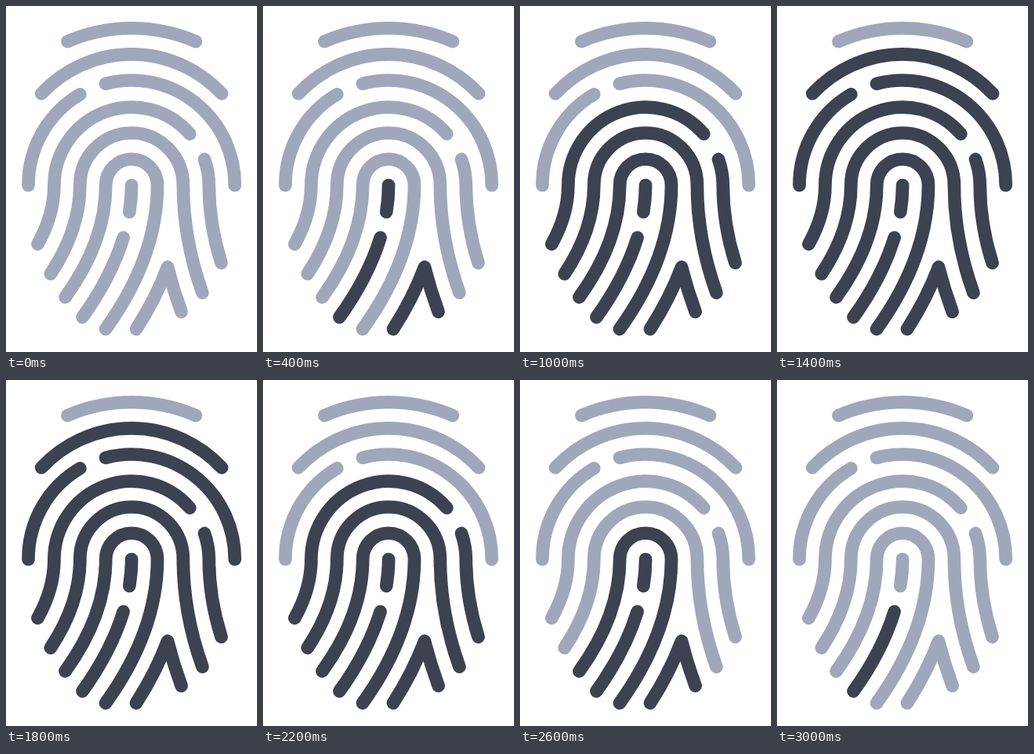
Recreate the animation shown at these times as an HTML page. Size 320 by 440 pixels, loop 3200 ms.

```html
<!DOCTYPE html>
<html lang="en">
<head>
<meta charset="utf-8">
<title>Fingerprint scan</title>
<style>
  html, body { margin: 0; width: 100%; height: 100%; overflow: hidden; background: #fff; }
  svg { display: block; width: 320px; height: 440px; }
  path { fill: none; stroke-width: 16.7; stroke-linecap: round; stroke-linejoin: round; }
</style>
</head>
<body>
<svg id="print" viewBox="0 0 320 440"></svg>
<script>
const STEP = 200;
const LIGHT = '#a0a7ba';
const DARK = '#3d4251';
const CX = 160.1, CY = 228, RX = 32.9, RY = 33.25;

const edge = n => CX + n * RX;
const arc = (n, x, y) => `A${Math.abs(n) * RX} ${Math.abs(n) * RY} 0 0 1 ${x} ${y}`;

// A ridge tail leaves the arch vertically and bends outwards.
const tailIn = (x, y, n) => `M${x} ${y}Q${edge(n)} ${(y + CY) / 2} ${edge(n)} ${CY}`;
const tailOut = (n, x, y) => `Q${edge(n)} ${(y + CY) / 2} ${x} ${y}`;
const arch = n => arc(n, edge(n), CY);

// Ridges in the order in which they light up, from the core to the tip.
const ridges = [
  'M149.6 294.6Q134 345 97.5 395.7',
  `M${CX} ${CY}Q${CX} 245 157.3 262M166 410.8Q191.3 371.5 206 332Q213.2 360.5 223.6 388.8`,
  tailIn(75.5, 370.3, -1) + arch(1) + tailOut(1, 127, 410.8),
  tailIn(56.8, 340.6, -2) + arch(2) + tailOut(2, 250.4, 364.7),
  tailIn(40.4, 302.8, -3) + arc(3, 234.3, 162.6)
    + `M253 195${arc(3, edge(3), CY)}` + tailOut(3, 274.5, 326.7),
  `M${edge(-4)} ${CY}${arc(4, 94.4, 112.4)}M127 98.8${arc(4, edge(4), CY)}`,
  'M45.2 111.4A157 157 0 0 1 275 111.4',
  'M78.4 45.1A207 207 0 0 1 241.9 45.1'
];

const svg = document.getElementById('print');
const paths = ridges.map(d => {
  const path = document.createElementNS('http://www.w3.org/2000/svg', 'path');
  path.setAttribute('d', d);
  return svg.appendChild(path);
});

function draw(time) {
  const count = ridges.length;
  const step = Math.floor(time / STEP) % (2 * count);
  const lit = count - Math.abs(count - step);
  paths.forEach((path, i) => path.setAttribute('stroke', i < lit ? DARK : LIGHT));
}

const start = performance.now();
function tick() {
  draw(performance.now() - start);
  requestAnimationFrame(tick);
}
tick();
</script>
</body>
</html>
```
